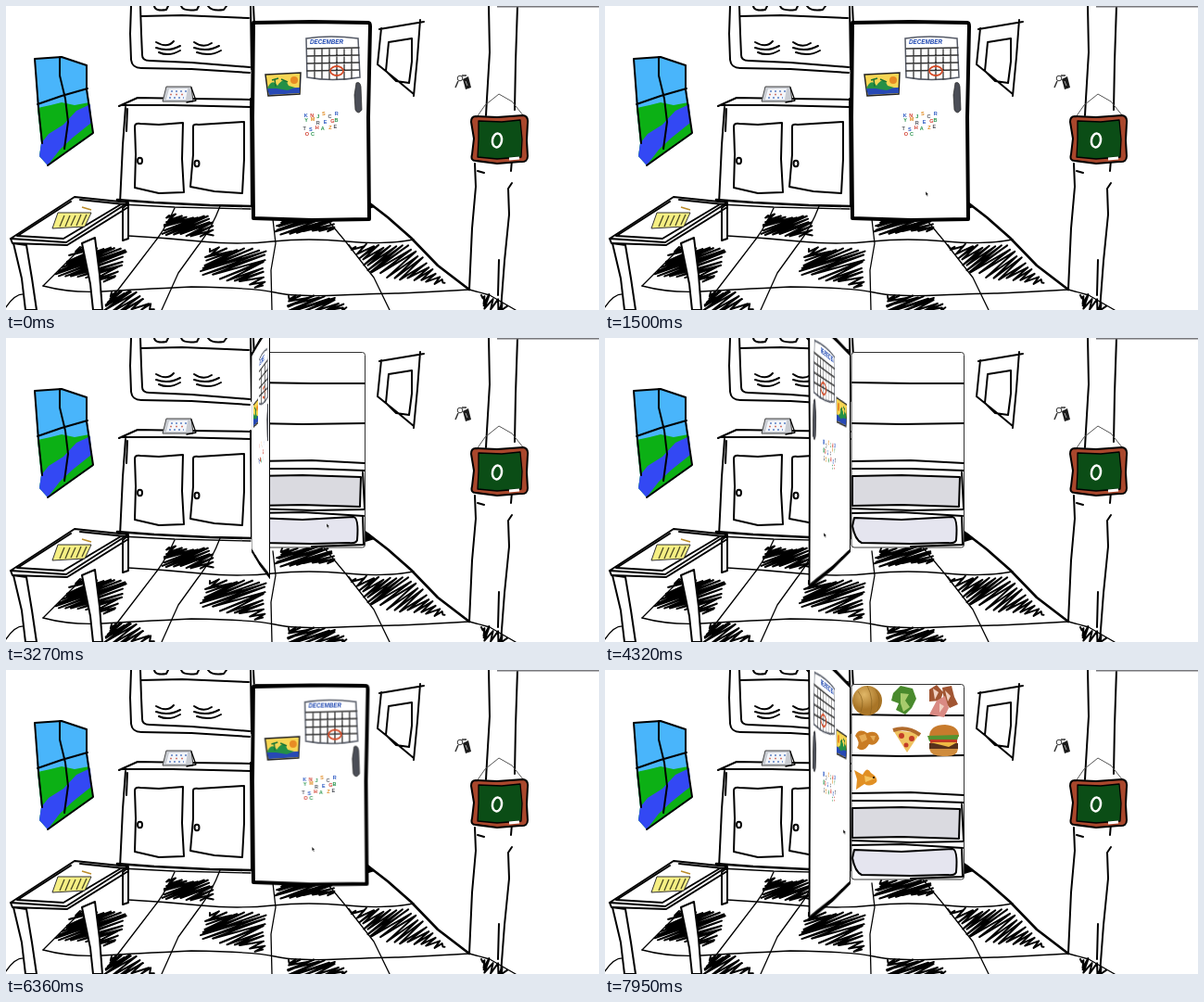
Recreate the animation shown at these times as an HTML page. Size 640x328 px, loop 8000 ms.

```html
<!DOCTYPE html>
<html lang="en">
<head>
<meta charset="utf-8">
<title>Kitchen fridge</title>
<style>
  html, body { margin: 0; width: 100%; height: 100%; overflow: hidden; background: #fff; }
  #stage { position: relative; width: 640px; height: 328px; overflow: hidden; }
  svg { position: absolute; left: 0; top: 0; width: 640px; height: 328px; overflow: visible; }
  #door { transform-origin: 265px 131px; }
  .ink { fill: none; stroke: #000; stroke-width: 2; stroke-linecap: round; stroke-linejoin: round; }
  .thin { stroke-width: 1.3; }
  .bold { stroke-width: 2.7; }
  .paper { fill: #fff; }
  text { font-family: "Liberation Sans", Arial, sans-serif; }
</style>
</head>
<body>
<div id="stage">
  <svg viewBox="0 0 640 328">
    <!-- floor -->
    <g class="ink thin">
      <path d="M123 214L182 217L264 219M132 248Q170 250 210 254T288 254T368 254T440 252M40 302Q70 310 104 308T200 303Q270 304 290 309T360 312T420 310T500 306"/>
      <path d="M182 218Q174 236 164 250L141 280L118 310M231 216Q222 240 207 259L186 288L168 328M288 230L291 256L286 285L287 328M343 226L368 256L397 293L414 328"/>
      <path class="bold" d="M390 211L412 228L437 250L466 280L500 306"/>
      <path d="M88 254L62 280L40 302M500 306L522 312L550 328M0 325Q10 310 20 311"/>
    </g>
    <path d="M388 208L398 217L388 220Z"/>
    <g id="tiles" class="ink"></g>

    <!-- window -->
    <path fill="#49b5fb" d="M31 57L60 55L87 64L88 90L94 138L45 172L36 162L38 148L34 110Z"/>
    <path fill="#0cb015" d="M34 110L48 107L60 104L74 107L90 104L94 138L45 172L36 162L38 148Z"/>
    <path fill="#3348f4" d="M91 106L76 113L62 128L46 138L38 148L36 162L45 172L58 155L72 142L92 126Z"/>
    <path class="ink" d="M31 57L60 55L87 64L87 90L94 137L45 172M31 57L35 110L39 148M58 55L58 75L64 100L67 125L63 154M34 106L60 97L88 89"/>

    <!-- wall cupboard -->
    <g class="ink">
      <path d="M135 0L134 30L135 58Q136 67 146 67L200 68L263 72M145 0L146 30L147 53Q147 59 155 59L200 61L263 66M146 11L190 10L262 13M264 0L265 68M267 0L268 20"/>
      <path d="M160 0Q161 6 173 4L175 0M189 0Q191 6 206 4L208 0M218 0Q222 6 235 4L238 0"/>
      <path d="M162 39Q174 46 181 38M162 45Q175 50 188 43M165 50Q176 55 188 48M203 39Q213 46 222 40M203 45Q217 50 230 43M206 50Q220 55 232 48"/>
    </g>

    <!-- counter -->
    <g class="ink">
      <path d="M122 108L142 99L200 100L265 101M124 107L180 107L265 109"/>
      <path d="M129 109L126 150L123 213M131 111L130 135M264 100L265 216"/>
      <path class="bold" d="M120 209L160 212L220 215L265 216"/>
      <path d="M139 130Q139 126 145 127L165 128L191 126L190 165L192 201L165 202L139 196L140 160ZM202 130Q202 127 208 128L257 125L257 165L255 202L225 200L199 195L202 160Z"/>
      <ellipse cx="144.500" cy="167" rx="2.500" ry="3.200"/><ellipse cx="206" cy="170" rx="2.500" ry="3.200"/>
    </g>
    <path fill="#c9ccd2" stroke="#444" d="M173 87L200 87L202 103L169 103Z"/>
    <path fill="#f4f6fa" d="M176 89.500L196 89L194 101L173 101Z"/>
    <path fill="none" stroke-width="1.500" stroke="#5b80c4" stroke-dasharray="2 3" d="M178 92H195M176 99H192"/>
    <path fill="none" stroke-width="1.500" stroke="#cf7a6e" stroke-dasharray="2 4" d="M177 95.500H193"/>
    <path class="ink thin" d="M200 88L205 102L195 104"/>

    <!-- table -->
    <g class="ink">
      <path class="paper" d="M8 256L17 294L21 328H33L28 294L22 258ZM82 256L91 300L94 328H104L101 290L96 250ZM126 218L126 253L132 251V213Z"/>
      <path class="paper" d="M74 206L132 212L65 255L5 251Z"/>
      <path d="M5 251L7 256L66 258L132 217M70 211L14 247M80 209L128 214M12 248L62 251L124 214"/>
    </g>
    <path fill="#f6ef83" stroke="#333" d="M56 223L92 223L85 238L50 240Z"/>
    <path fill="none" stroke="#4b4925" stroke-width="1.300" d="M63 226L58 238M69 226L64 238M75 226L70 237M81 225L76 237M87 225L82 236"/>
    <path stroke="#bb8b28" stroke-width="1.500" d="M82 217L92 220"/>

    <!-- wall picture and door post -->
    <g class="ink">
      <path d="M403 25L451 17M447 15L444 55L440 97M405 24L401 63L422 80L440 95M413 39L438 35L438 60L435 83L421 81L410 70Z"/>
      <path d="M521 0L522 50L519 100L518 118M506 170L507 195L503 240L500 306M552 0L550 60L549 112M546 166L545 178M546 191L542 197L543 225L538 275L534 328M532 274L531 312M509 178L516 180"/>
    </g>
    <rect x="530" width="110" height="1.500" fill="#77777b"/>

    <!-- keys -->
    <g fill="none" stroke="#333"><circle cx="490" cy="78" r="2.800"/><path stroke-width="1.500" d="M488 81L485 88M492 75L497 75"/></g>
    <path fill="#1b1b1b" d="M493 79L499 76L502 88L496 90Z"/>
    <path stroke="#aaa" d="M496 81L498 86"/>

    <!-- chalkboard -->
    <path fill="none" stroke="#555" d="M508 120L517 107L532 95L546 103L559 119"/>
    <path class="ink" style="fill:#a9472c" d="M507 119L530 120L558 118Q564 119 563 126L562 145L563 162Q563 169 555 168L530 170L507 167Q501 167 503 160L505 143L502 125Q502 119 507 119Z"/>
    <path class="ink thin" style="fill:#0b4d16" d="M510 124L535 125L555 123L557 144L556 163L530 165L509 163L510 144Z"/>
    <ellipse cx="530" cy="145" rx="5" ry="7.500" fill="none" stroke="#fff" stroke-width="2.500" transform="rotate(10 530 145)"/>
    <path stroke="#fff" stroke-width="3" d="M543 165L554 164"/>

    <!-- fridge interior -->
    <g id="inside">
      <rect x="266" y="15.500" width="121.500" height="210.500" rx="3" fill="#fff" stroke="#333"/>
      <g class="ink">
        <path d="M267 48L330 49L387 49M267 92L320 93L387 92M267 133L330 132L387 135M267 141L330 141L387 143"/>
        <path style="fill:#dadae0" d="M267 149L320 148L383 150L382 182L320 180L267 181Z"/>
        <path d="M267 184L330 186L386 185M267 189L320 188L386 192M385 145L387 184"/>
        <path style="fill:#e5e5ef" d="M269 194L320 196L375 193Q381 194 379 218Q378 222 370 221L330 222L277 221Q270 218 267 203Z"/>
        <path d="M385 192L386 223L330 225"/>
      </g>
      <g id="food">
        <circle cx="283" cy="33" r="16" fill="url(#melon)"/>
        <path fill="none" stroke="#8a6420" stroke-width=".7" d="M273 23Q281 33 276 45M283 17Q291 32 286 49M292 21Q299 32 294 44"/>
        <path fill="#498a2d" d="M311 25L319 17L332 20L336 31L331 41L324 48L314 43L317 36L309 33Z"/>
        <path fill="#a7cb6c" d="M319 25L328 26L324 33L329 40L322 45L319 36Z"/>
        <path fill="#a15532" d="M350 21L358 16L365 24L362 33L350 34ZM364 19L374 17L377 29L381 37L372 41L366 33Z"/>
        <path fill="#d98a83" d="M358 33L367 28L371 41L366 51L350 48Z"/>
        <path fill="#f0d0c1" d="M354 20L360 24L356 32ZM367 22L373 28L370 34ZM361 36L366 39L361 46Z"/>
        <path fill="#c97c24" d="M270 71Q274 62 283 68Q294 64 296 74Q292 83 285 80Q279 90 272 84Q276 78 270 71Z"/>
        <path fill="#e5ab55" d="M274 71L281 69L283 75L277 78ZM286 71L292 71L290 77Z"/>
        <path fill="#efc260" d="M311 65L340 68L326 89Z"/>
        <path fill="none" stroke="#b16b2c" stroke-width="4" d="M311 65Q326 60 340 70"/>
        <g fill="#c43c26"><circle cx="320" cy="71" r="3"/><circle cx="331" cy="74" r="3"/><circle cx="325" cy="81" r="2.500"/></g>
        <path fill="#c77b2d" d="M350 71Q351 59 367 59Q382 60 382 72Z"/>
        <path fill="#539332" d="M348 71L382 70L380 76L350 77Z"/>
        <path fill="#c33b25" d="M351 75H380V79H351Z"/>
        <path fill="#58321c" d="M350 79H381V85H350Z"/>
        <path fill="#efb944" d="M351 78H380L371 83Z"/>
        <path fill="#cf8c3d" d="M350 85H381Q380 94 367 93Q352 94 350 85Z"/>
        <path fill="#e19024" d="M272 118L269 108L278 113Q283 103 287 111Q295 116 293 121Q286 127 280 123L271 129Z"/>
        <path fill="#f5c45f" d="M280 114L291 117L281 121Z"/><circle cx="290" cy="116" r="1"/>
      </g>
    </g>
    <defs><radialGradient id="melon" cx=".4" cy=".3"><stop stop-color="#e0b768"/><stop offset="1" stop-color="#a97527"/></radialGradient></defs>
  </svg>

  <svg id="door" viewBox="0 0 640 328">
    <path fill="#fff" stroke="#000" stroke-width="4" stroke-linejoin="round" d="M267 18L330 17L391 18Q393 18 393 22L391 120L392 230L330 231L267 229L266 120Z"/>
    <path fill="#fff" stroke="#555a66" stroke-width="1.500" d="M324 35Q350 31 380 35L382 77Q352 82 325 77Z"/>
    <text x="328" y="41" font-size="6.300" font-weight="bold" font-style="italic" fill="#1d46b0">DECEMBER</text>
    <path class="ink thin" style="stroke:#333" d="M325 46L381 45M325 54L381 53M325 62L381 61M325 70L381 69M333 46V78M341 46V78M349 46V79M357 46V79M365 46V79M373 46V78"/>
    <ellipse cx="357" cy="70" rx="7" ry="5" fill="none" stroke="#d34a26" stroke-width="1.800"/>
    <path fill="#f7d654" stroke="#222" stroke-width="1.500" d="M280 74L318 72L317 95L283 97Z"/>
    <path fill="#2749b5" d="M282 89L317 88V94L284 96Z"/>
    <path fill="#249046" d="M282 89Q287 77 293 86Q300 75 305 86L312 88L304 91L292 89Z"/>
    <path stroke="#187333" stroke-width="1.500" fill="none" d="M287 80L294 78M291 87L290 79M297 79L304 82"/>
    <circle cx="311" cy="80" r="4" fill="#e88b24"/>
    <path fill="#4b4e57" stroke="#222" stroke-width=".7" d="M378 83Q382 81 383 87L384 112Q380 118 377 112L376 96Z"/>
    <g id="magnets" font-size="5.500" font-weight="bold"></g>
  </svg>

  <svg viewBox="0 0 640 328">
    <path id="cursor" fill="#111" stroke="#fff" stroke-width=".4" d="M0 0V4.500L1 3.700L1.800 5.500L2.600 5.100L1.900 3.500L3.200 3.300Z"/>
  </svg>
</div>
<script>
const LOOP = 8000, SWING = 900, DOOR_WIDTH = 128;
const $ = id => document.getElementById(id);
const clamp = v => Math.min(1, Math.max(0, v));
const lerp = (a, b, k) => a + (b - a) * k;

let seed = 11;
const random = () => (seed = seed * 16807 % 2147483647) / 2147483647;
const jitter = amount => (random() - .5) * amount;

// Point at k on the two-part line a-b-c.
const along = (a, b, c, k) => [0, 1].map(i =>
  (k < .5 ? lerp(a[i], b[i], k * 2) : lerp(b[i], c[i], k * 2 - 1)) + jitter(4));

// Rising pen strokes that fill a floor tile from its top left to its bottom right corner.
function scribble(turns, topLeft, topRight, bottomRight, bottomLeft) {
  let d = "M" + topLeft;
  for (let i = 1; i < turns; i++) {
    const k = i / turns;
    d += "L" + along(topLeft, bottomLeft, bottomRight, k)
       + "L" + along(topLeft, topRight, bottomRight, clamp(k + .02));
  }
  return `<path d="${d}"/>`;
}

$("tiles").innerHTML = [
  [15, [176, 226], [221, 228], [222, 248], [169, 246]],
  [15, [298, 227], [350, 227], [354, 243], [292, 245]],
  [17, [80, 260], [131, 263], [115, 297], [52, 291]],
  [17, [220, 262], [280, 264], [277, 304], [210, 289]],
  [22, [370, 258], [437, 260], [477, 301], [396, 289]],
  [14, [114, 309], [139, 309], [161, 328], [106, 330]],
  [14, [305, 313], [349, 314], [371, 328], [302, 330]],
  [8, [513, 312], [525, 314], [543, 328], [517, 328]]
].map(tile => scribble(...tile)).join("");

const inks = ["#2a58c2", "#d03a2b", "#25924a", "#e08a20", "#50545c"];
$("magnets").innerHTML = ["KNJSCR", "YMREGB", "TSHAZE", "OC"].map((row, r) =>
  [...row].map((letter, i) => {
    const x = 321 + i * 6.5 + r % 2 * 2 + jitter(3), y = 119 + r * 7 + jitter(4);
    return `<text x="${x}" y="${y}" fill="${inks[(i + r * 2) % 5]}">${letter}</text>`;
  }).join("")).join("");

const ramp = (t, start) => clamp((t - start) / SWING);
const openness = t => ramp(t, 2627) - ramp(t, 5505) + ramp(t, 6893);

// Projective map that keeps the hinge fixed and brings the free edge forward.
function swingDoor(open) {
  const travel = 173 * open ** 1.4;
  const scale = 1 + .0031 * travel - .0000049 * travel ** 2;
  const sx = (DOOR_WIDTH - travel) / DOOR_WIDTH / scale;
  const depth = (1 / scale - 1) / DOOR_WIDTH;
  $("door").style.transform = `matrix3d(${sx},0,0,${depth.toFixed(8)},0,1,0,0,0,0,1,0,0,0,0,1)`;
}

const route = [
  [100, 638, 326], [900, 346, 200], [3450, 346, 200], [4100, 236, 210], [4600, 236, 210],
  [5200, 232, 193], [5800, 232, 193], [6600, 357, 190], [7200, 357, 190], [7800, 257, 172], [LOOP, 257, 172]
];

function moveCursor(t) {
  const next = route.findIndex(stop => stop[0] > t);
  $("cursor").style.visibility = next > 0 ? "visible" : "hidden";
  if (next < 1) return;
  const [t0, x0, y0] = route[next - 1], [t1, x1, y1] = route[next];
  const p = (t - t0) / (t1 - t0), k = p * p * (3 - 2 * p);
  $("cursor").setAttribute("transform", `translate(${lerp(x0, x1, k)} ${lerp(y0, y1, k)})`);
}

function draw(now) {
  const t = now % LOOP, open = openness(t);
  swingDoor(open);
  $("inside").style.visibility = open > 0 ? "visible" : "hidden";
  $("food").style.display = t > 6600 ? "" : "none";
  moveCursor(t);
}

const start = performance.now();
function tick() {
  draw(performance.now() - start);
  requestAnimationFrame(tick);
}
tick();
</script>
</body>
</html>
```
